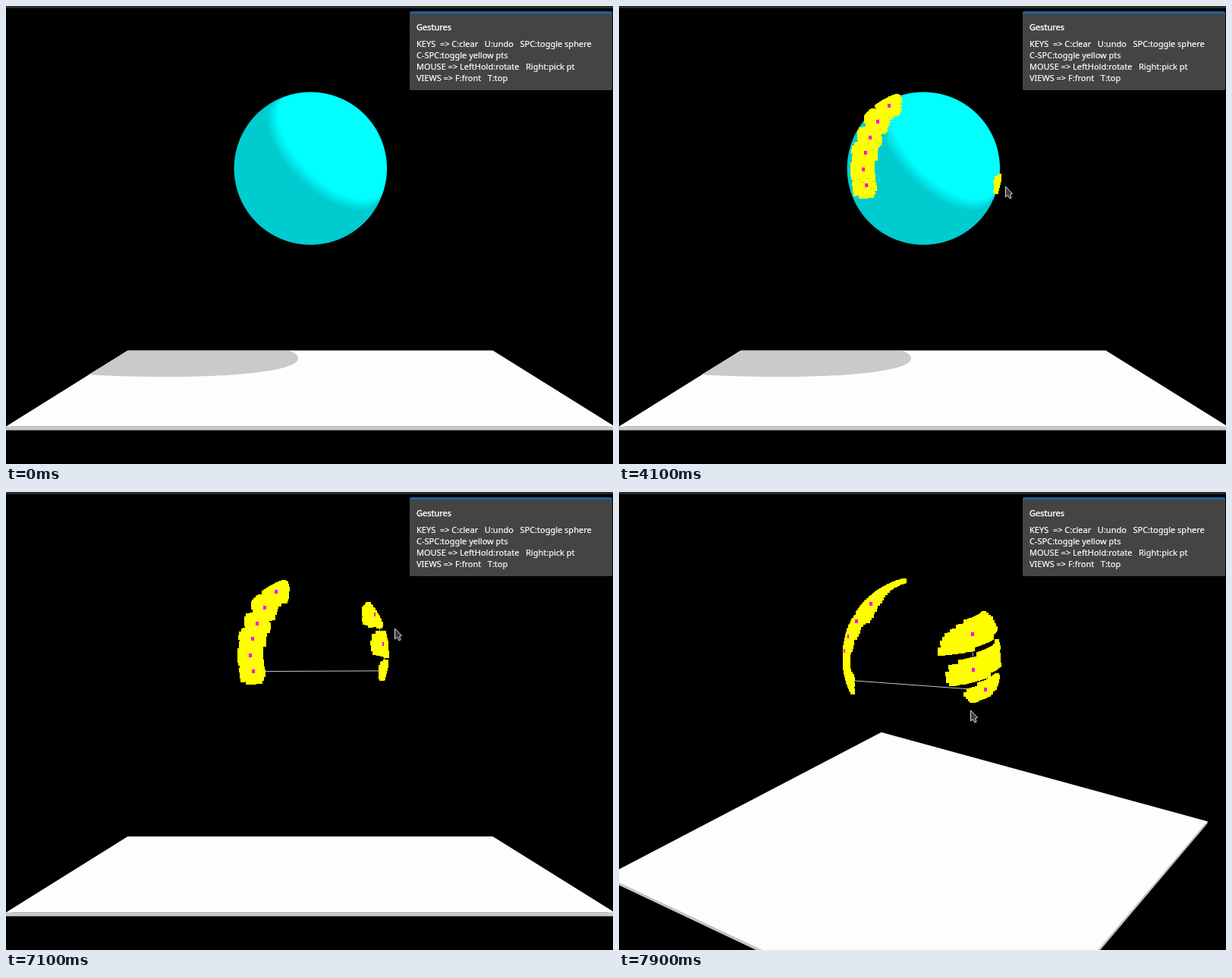
These frames come from a looping animation (800 px wide and 604 px high, 8 s). An HTML page with a canvas:

```html
<!DOCTYPE html>
<html lang="en">
<head>
<meta charset="utf-8">
<title>Sphere picking</title>
<style>
  html, body { margin: 0; width: 100%; height: 100%; overflow: hidden; background: #000; }
  #stage { position: relative; width: 800px; height: 604px; overflow: hidden; }
  canvas { display: block; }
  .panel {
    position: absolute; left: 532px; top: 7px; width: 267px; height: 104px;
    box-sizing: border-box; border-top: 3px solid #1d619c; border-radius: 2px;
    background: #444; color: #fff;
    font: 11px/15px "Noto Sans", "Open Sans", sans-serif;
    -webkit-text-stroke: 0.2px #fff;
  }
  .panel div { position: absolute; left: 9px; white-space: pre; }
  .title { top: 10px; -webkit-text-stroke-width: 0.4px; }
  .help { top: 32px; }
</style>
</head>
<body>
<div id="stage">
  <canvas id="view" width="800" height="604"></canvas>
  <div class="panel">
    <div class="title">Gestures</div>
    <div class="help">KEYS  =&gt; C:clear   U:undo   SPC:toggle sphere
C-SPC:toggle yellow pts
MOUSE =&gt; LeftHold:rotate   Right:pick pt
VIEWS =&gt; F:front   T:top</div>
  </div>
</div>
<script>
const ctx = document.getElementById('view').getContext('2d');

const LOOP = 8000, STEP = 100, TRAVEL = 400;
const HIDE_SPHERE = 7000, ROTATE = 7500;
const CX = 401, CY = 304.5, FOCAL = 1205, DIST = 12.02;
const FLOOR = { y: -1.871, half: 3, thick: 0.037 };
const SPHERE = { y: 0.898, cx: 401.3, cy: 214.2, r: 100.7 };
const BRUSH = 15.5;
const FRONT = { yaw: 0, pitch: 0 };
const DRAG = { x: 584, y: 234, yaw: 0.005, pitch: 0.00711 };

const stop = (time, x, y) => ({ time, x, y });

// Six clicks sweep down the left side, three climb the right rim
const leftClicks = Array.from({ length: 6 }, (_, i) => {
  const angle = (119 + 15.5 * i) * Math.PI / 180;
  const r = 79 + 14.5 * Math.max(0, 1 - i / 3) ** 2;
  return stop(1000 + 400 * i, SPHERE.cx + r * Math.cos(angle), SPHERE.cy - r * Math.sin(angle));
});
const rightClicks = [stop(4000, 509, 238), stop(4900, 498, 201), stop(6400, 487, 162)];
const clicks = [...leftClicks, ...rightClicks];

const pointerStops = [
  ...clicks,
  stop(400, 620, 420), stop(3500, 640, 280), stop(5800, 642, 440),
  stop(7400, 588, 232), stop(ROTATE, 584, 243), stop(7900, 463, 288)
].sort((a, b) => a.time - b.time);

function rotate([x, y, z], { yaw, pitch }) {
  const c = Math.cos(yaw), s = Math.sin(yaw);
  const cp = Math.cos(pitch), sp = Math.sin(pitch);
  const depth = z * c + x * s;
  return [x * c - z * s, y * cp - depth * sp, y * sp + depth * cp];
}

function project(p, pose) {
  const [x, y, z] = rotate(p, pose);
  const k = FOCAL / (DIST - z);
  return [CX + x * k, CY - y * k];
}

const normalOf = ([x, y, z]) => [x, y - SPHERE.y, z];

// Point of the sphere under a screen position, or the nearest one on its rim
function unproject(px, py) {
  const u = (px - CX) / FOCAL, v = (CY - py) / FOCAL;
  const a = u * u + v * v + 1;
  const b = v * SPHERE.y + DIST;
  const c = SPHERE.y ** 2 + DIST ** 2 - 1;
  const k = (b - Math.sqrt(Math.max(0, b * b - a * c))) / a;
  const n = normalOf([u * k, v * k, DIST - k]);
  const len = Math.hypot(...n);
  return [n[0] / len, n[1] / len + SPHERE.y, n[2] / len];
}

// Vertices of a latitude/longitude sphere that fall under the brush
function brushDots({ x, y }, center) {
  const n = 150, da = 2 * Math.PI / n, dots = [];
  for (let i = 1; i < n / 2; i++) {
    for (let j = 0; j < n; j++) {
      const ring = Math.sin(i * da);
      const p = [ring * Math.cos(j * da), SPHERE.y + Math.cos(i * da), ring * Math.sin(j * da)];
      if (Math.abs(p[2] - center[2]) > 0.6) continue;
      const [px, py] = project(p, FRONT);
      if (Math.abs(px - x) ** 3 + Math.abs(py - y) ** 3 < BRUSH ** 3) dots.push(p);
    }
  }
  return dots;
}

function shadeSphere() {
  const { cx, cy, r } = SPHERE, size = 206;
  const left = Math.floor(cx - size / 2), top = Math.floor(cy - size / 2);
  const canvas = document.createElement('canvas');
  canvas.width = canvas.height = size;
  const c = canvas.getContext('2d');
  const img = c.createImageData(size, size);
  const clamp = v => Math.min(1, Math.max(0, v));
  for (let j = 0; j < size; j++) {
    for (let i = 0; i < size; i++) {
      const x = (left + i + 0.5 - cx) / r, y = (cy - top - j - 0.5) / r;
      const d = Math.hypot(x, y);
      const z = Math.sqrt(Math.max(0, 1 - d * d));
      const lit = clamp((0.6 * x + 0.62 * y + 0.5 * z - 0.31) / 0.16);
      const o = 4 * (j * size + i);
      img.data[o + 1] = 204 + 51 * lit;
      img.data[o + 2] = 208 + 47 * lit;
      img.data[o + 3] = 255 * clamp((1 - d) * r + 0.5);
    }
  }
  c.putImageData(img, 0, 0);
  return { canvas, left, top };
}

function polygon(points, fill) {
  ctx.beginPath();
  points.forEach(([x, y]) => ctx.lineTo(x, y));
  ctx.closePath();
  ctx.fillStyle = fill;
  ctx.fill();
}

function drawFloor(pose) {
  const { y, half: h, thick } = FLOOR;
  const ring = level => [[-h, -h], [h, -h], [h, h], [-h, h]]
    .map(([x, z]) => project([x, level, z], pose));
  const top = ring(y), low = ring(y - thick);
  for (let i = 0; i < 4; i++) {
    const j = (i + 1) % 4;
    polygon([top[i], top[j], low[j], low[i]], '#c8c8c8');
  }
  polygon(top, '#fdfdfd');
}

function drawShadow() {
  ctx.beginPath();
  ctx.moveTo(160, 455);
  ctx.lineTo(374, 455);
  ctx.bezierCurveTo(382, 458, 385, 461, 385, 465);
  ctx.bezierCurveTo(385, 480, 310, 489, 215, 489);
  ctx.bezierCurveTo(170, 489, 135, 488, 109, 486);
  ctx.closePath();
  ctx.fillStyle = '#cacaca';
  ctx.fill();
}

function drawPath(shown, pose) {
  ctx.beginPath();
  shown.forEach(k => ctx.lineTo(...project(k.p, pose)));
  ctx.strokeStyle = '#c4c4c4';
  ctx.lineWidth = 1;
  ctx.stroke();
}

// On the solid sphere only the outward part of each square stays visible
function drawDot(p, pose, solid) {
  const [x, y] = project(p, pose).map(Math.round);
  if (!solid) {
    ctx.fillRect(x - 3, y - 3, 6, 6);
    return;
  }
  const [nx, ny, nz] = normalOf(p);
  if (nz < 0.02) return;
  for (let dx = -2; dx <= 2; dx += 2) {
    for (let dy = -2; dy <= 2; dy += 2) {
      if (nx * dx - ny * dy > -0.3) ctx.fillRect(x + dx - 1, y + dy - 1, 2, 2);
    }
  }
}

function drawPicks(shown, pose, solid) {
  ctx.fillStyle = '#ff0';
  for (const k of shown) k.dots.forEach(p => drawDot(p, pose, solid));
  ctx.fillStyle = '#f0f';
  for (const k of shown) {
    const facing = rotate(normalOf(k.p), pose)[2];
    if (facing < 0.12) continue;
    const [x, y] = project(k.p, pose).map(Math.round);
    ctx.fillRect(x - 2, y - 3, facing < 0.36 ? 2 : 4, 5);
  }
}

// The pointer rests at each stop and leaves just in time for the next
function pointerAt(t) {
  const i = pointerStops.findIndex(s => s.time >= t);
  if (i < 0) return pointerStops[pointerStops.length - 1];
  const b = pointerStops[i], a = pointerStops[i - 1] || b;
  const span = Math.min(TRAVEL, b.time - a.time) || 1;
  const u = Math.max(0, 1 - (b.time - t) / span);
  return { x: a.x + (b.x - a.x) * u, y: a.y + (b.y - a.y) * u };
}

function drawPointer({ x, y }) {
  const outline = [[0, 0], [0, 14], [3, 11.5], [5.5, 16], [7.5, 15], [6, 10.5], [9, 9.5]];
  polygon(outline.map(([dx, dy]) => [Math.round(x) + dx + 0.5, Math.round(y) + dy]), '#3d3d3d');
  ctx.strokeStyle = '#dcdcdc';
  ctx.lineWidth = 1;
  ctx.stroke();
}

function draw(t) {
  const tip = pointerAt(t), solid = t < HIDE_SPHERE;
  const pose = t < ROTATE ? FRONT
    : { yaw: (DRAG.x - tip.x) * DRAG.yaw, pitch: (tip.y - DRAG.y) * DRAG.pitch };
  const shown = picks.filter(k => k.time <= t);
  ctx.fillStyle = '#000';
  ctx.fillRect(0, 0, 800, 604);
  drawFloor(pose);
  if (solid) {
    drawShadow();
    ctx.drawImage(sphere.canvas, sphere.left, sphere.top);
  } else {
    drawPath(shown, pose);
  }
  drawPicks(shown, pose, solid);
  if (t >= pointerStops[0].time) drawPointer(tip);
  ctx.fillStyle = '#2b2b2b';
  ctx.fillRect(0, 0, 800, 3);
}

const sphere = shadeSphere();
const picks = clicks.map(click => {
  const p = unproject(click.x, click.y);
  return { time: click.time, p, dots: brushDots(click, p) };
});
const start = performance.now();
let last = -1;

function tick() {
  const t = Math.floor(((performance.now() - start) % LOOP) / STEP) * STEP;
  if (t !== last) draw(last = t);
  requestAnimationFrame(tick);
}
tick();
</script>
</body>
</html>
```
